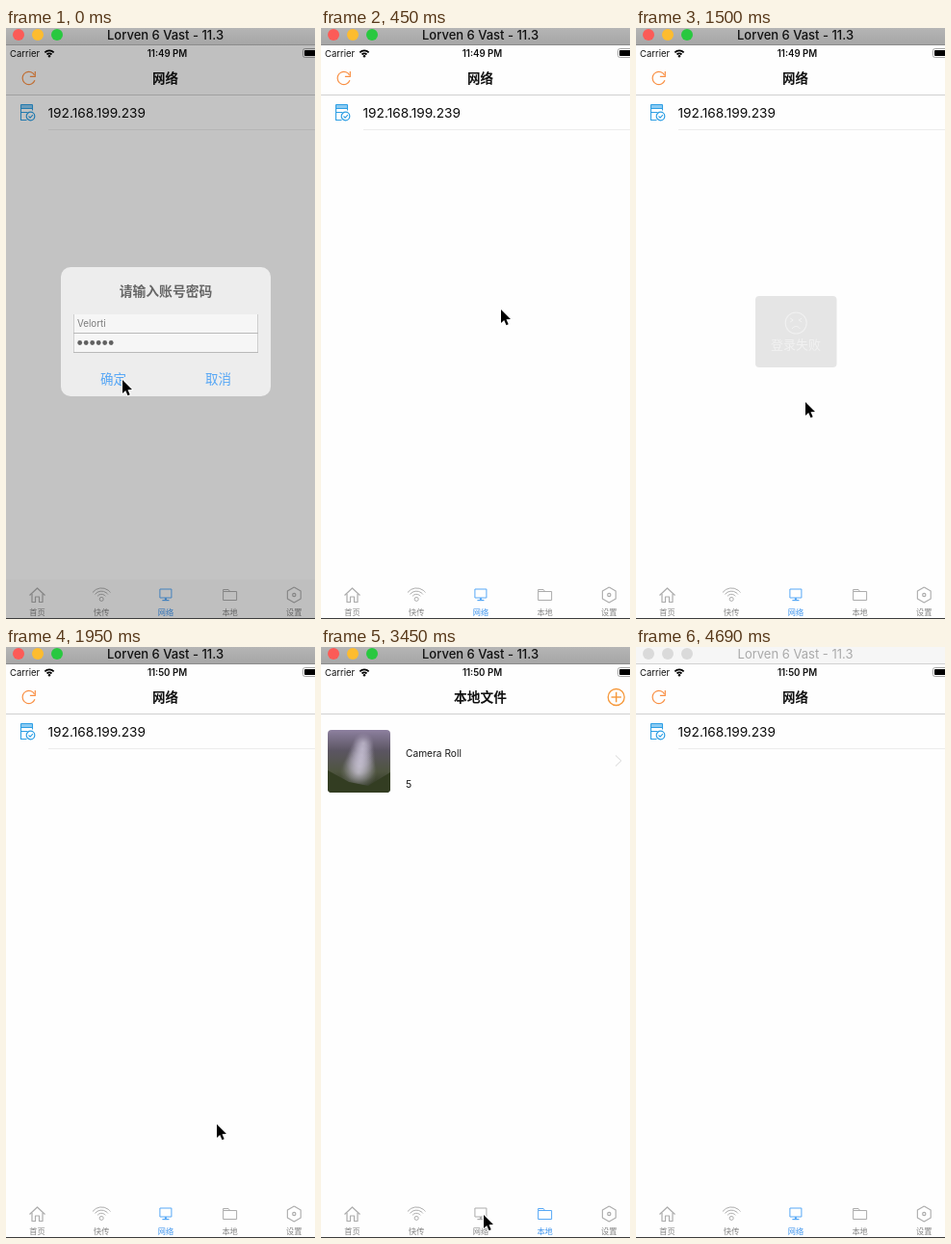
Recreate the animation shown at these times as an HTML page with a canvas. Size 321 by 613 pixels, loop 4790 ms.

```html
<!DOCTYPE html>
<html lang="zh">
<head>
<meta charset="utf-8">
<title>网络</title>
<style>
  html, body { margin: 0; width: 100%; height: 100%; overflow: hidden; background: #fff; }
  canvas { display: block; width: 321px; height: 613px; }
</style>
</head>
<body>
<canvas id="stage"></canvas>
<script>
const W = 321, H = 613, LOOP = 4790, STEP = 150;
const TAU = Math.PI * 2, UP = Math.PI * 1.5;
const canvas = document.getElementById('stage');
const ctx = canvas.getContext('2d');
const dpr = window.devicePixelRatio || 1;
canvas.width = W * dpr;
canvas.height = H * dpr;

const CJK = '"Noto Sans CJK SC", "Noto Sans CJK", sans-serif';
const LATIN = 'Inter, ' + CJK;
const BLUE = '#57a8f6', GRAY = '#acacac', ORANGE = '#f98f43', SKY = '#2e9fe4';

// Pointer stops: step, x, y
const STOPS = [
  [0, 121, 365], [1, 132, 350], [2, 135, 319], [3, 187, 292], [4, 174, 299], [6, 174, 299],
  [8, 151, 289], [9, 156, 312], [10, 176, 388], [11, 201, 419], [13, 219, 495], [14, 219, 499],
  [15, 229, 556], [17, 233, 585], [21, 233, 585], [23, 169, 589], [25, 169, 589], [27, 246, 612]
];

function text(str, x, y, size, color, align = 'left', weight = 400, family = LATIN) {
  ctx.font = `${weight} ${size}px ${family}`;
  ctx.textAlign = align;
  ctx.fillStyle = color;
  ctx.fillText(str, x, y + size * 0.37);
}

function han(str, x, y, size, color, weight = 400) {
  text(str, x, y, size, color, 'center', weight, CJK);
}

function box(x, y, w, h, color) {
  ctx.fillStyle = color;
  ctx.fillRect(x, y, w, h);
}

function frame(x, y, w, h, color, width = 1) {
  ctx.strokeStyle = color;
  ctx.lineWidth = width;
  ctx.strokeRect(x, y, w, h);
}

function roundPath(x, y, w, h, r) {
  ctx.beginPath();
  ctx.roundRect(x, y, w, h, r);
}

function roundBox(x, y, w, h, r, color) {
  roundPath(x, y, w, h, r);
  ctx.fillStyle = color;
  ctx.fill();
}

function trace(points) {
  ctx.beginPath();
  for (let i = 0; i < points.length; i += 2) ctx.lineTo(points[i], points[i + 1]);
}

function line(color, width, ...points) {
  trace(points);
  ctx.strokeStyle = color;
  ctx.lineWidth = width;
  ctx.stroke();
}

function shape(color, ...points) {
  trace(points);
  ctx.fillStyle = color;
  ctx.fill();
}

function arc(color, width, x, y, r, from = 0, to = TAU) {
  ctx.beginPath();
  ctx.arc(x, y, r, from, to);
  ctx.strokeStyle = color;
  ctx.lineWidth = width;
  ctx.stroke();
}

function waves(color, width, x, y, spread, radii) {
  radii.forEach(r => arc(color, width, x, y, r, UP - spread, UP + spread));
}

function dot(color, x, y, r) {
  ctx.beginPath();
  ctx.arc(x, y, r, 0, TAU);
  ctx.fillStyle = color;
  ctx.fill();
}

function fade(y0, y1, ...colors) {
  const g = ctx.createLinearGradient(0, y0, 0, y1);
  colors.forEach((c, i) => g.addColorStop(i / (colors.length - 1), c));
  return g;
}

// Runs a drawing with its own origin
function at(x, y, paint) {
  ctx.save();
  ctx.translate(x, y);
  paint();
  ctx.restore();
}

function windowBar(active) {
  box(0, 0, W, 18, active ? fade(0, 18, '#b5b5b5', '#a5a5a5') : '#f6f6f6');
  box(0, 17, W, 1, active ? '#8c8c8c' : '#d2d2d2');
  ['#fc5b57', '#fdbc2f', '#29c840'].forEach((c, i) => dot(active ? c : '#dadada', 13 + i * 20, 7, 6));
  text('Lorven 6 Vast - 11.3', 165.5, 7.5, 13, active ? '#111' : '#a9a9a9', 'center', active ? 500 : 400);
}

function statusBar(clock) {
  text('Carrier', 4, 26.5, 9.5, '#111');
  waves('#000', 1.8, 45, 30, 0.78, [3.5, 6.6]);
  dot('#000', 45, 29.2, 1.2);
  text(clock, 167.5, 26.5, 9.7, '#111', 'center', 600);
  roundPath(308.5, 21.5, 18, 9, 2);
  ctx.strokeStyle = '#a8a8a8';
  ctx.lineWidth = 1;
  ctx.stroke();
  roundBox(310, 23, 16, 6, 1, '#000');
}

function refreshIcon() {
  arc(ORANGE, 1.2, 0, 0, 6.6, 0.35, TAU - 0.5);
  line(ORANGE, 1.2, 6.6, -7, 6.6, -1.6, 1.2, -1.6);
}

function serverIcon() {
  box(-6, -8, 12, 4, '#8ccbf2');
  [-8, -4, 0].forEach(y => line(SKY, 1, -6, y, y ? 6 : 1, y));
  line(SKY, 1.1, 0, 8, -6, 8, -6, -8);
  line(SKY, 1.1, 6, -8, 6, -2);
  arc(SKY, 1.2, 4, 4, 4.3);
  line(SKY, 1.1, 2, 4, 3.6, 5.6, 6.4, 2.6);
}

function networkPage() {
  han('网络', 165.5, 52, 13.5, '#111', 700);
  at(23.7, 52, refreshIcon);
  at(21.5, 87.5, serverIcon);
  text('192.168.199.239', 43.5, 88, 13.7, '#0a0a0a');
  box(44, 105, W - 44, 1, '#ececec');
}

function photo() {
  ctx.save();
  roundPath(0, 0, 65, 65, 4);
  ctx.clip();
  box(0, 0, 65, 65, fade(0, 65, '#8d809f', '#5b5562', '#4f5540', '#252d19'));
  // Falling water, wider and dimmer towards the mist
  for (let i = 0; i < 6; i++) {
    const x = 37 - i, y = 14 + i * 6, r = 11 + i * 1.6;
    const g = ctx.createRadialGradient(x, y, 0, x, y, r);
    g.addColorStop(0, 'rgba(214,208,226,0.6)');
    g.addColorStop(1, 'rgba(190,182,206,0)');
    box(0, 0, 65, 65, g);
  }
  shape('#333d22', 0, 42, 22, 54, 42, 58, 65, 44, 65, 65, 0, 65);
  ctx.restore();
}

function localPage() {
  han('本地文件', 165.5, 52, 13.7, '#111', 700);
  at(306.7, 52, () => {
    arc('#f6983a', 1.3, 0, 0, 8.5);
    line('#f6983a', 1.4, -5.2, 0, 5.2, 0);
    line('#f6983a', 1.4, 0, -5.2, 0, 5.2);
  });
  at(7, 86, photo);
  text('Camera Roll', 88, 110.5, 10.2, '#1a1a1a');
  text('5', 88, 142.5, 10.5, '#1a1a1a');
  line('#d6d6d6', 1, 306, 112.5, 311.8, 118, 306, 123.5);
}

// Icons are centred on their origin
const TABS = [
  ['首页', c => {
    line(c, 1.2, -8, 0.5, 0, -7, 8, 0.5);
    line(c, 1.2, -5.5, -1, -5.5, 7.5, -2, 7.5, -2, 2, 2, 2, 2, 7.5, 5.5, 7.5, 5.5, -1);
  }],
  ['快传', c => {
    arc(c, 1, 0, 4.4, 2);
    waves(c, 1, 0, 4.5, 0.92, [5.2, 8.4, 11.6]);
  }],
  ['网络', c => {
    frame(-6, -6, 12, 9, c);
    box(-1, 3, 2, 2, c);
    box(-3.5, 5, 7, 1.2, c);
  }],
  ['本地', c => {
    frame(-7, -3.5, 14, 9, c);
    line(c, 1, -7, -3.5, -7, -5.5, -1.5, -5.5, 0, -3.5);
  }],
  ['设置', c => {
    const hex = [];
    for (let i = 0; i <= 6; i++) hex.push(8 * Math.sin(i * TAU / 6), -8 * Math.cos(i * TAU / 6));
    line(c, 1.1, ...hex);
    arc(c, 1.2, 0, 0, 1.6);
  }]
];

function tabBar(active) {
  TABS.forEach(([name, icon], i) => {
    const x = 32.5 + i * 66.7, on = i === active;
    at(x, 588, () => icon(on ? BLUE : GRAY));
    han(name, x, 606, 8.2, on ? '#3d94ee' : '#858585');
  });
}

function dialog(alpha) {
  ctx.globalAlpha = alpha;
  roundBox(57, 248, 218, 134, 10, '#ededed');
  han('请输入账号密码', 166, 272.5, 13.8, '#666', 700);
  box(70, 297, 192, 40, '#f6f6f6');
  [70, 261].forEach(x => box(x, 297, 1, 40, '#cfcfcf'));
  [316, 336].forEach(y => box(70, y, 192, 1, '#b9b9b9'));
  text('Velorti', 74, 306.5, 9.8, '#7b7b7b');
  for (let i = 0; i < 6; i++) dot('#616161', 76.7 + i * 6.5, 326.5, 2.4);
  han('确定', 111.5, 364.5, 13.5, '#55a6f5');
  han('取消', 220.5, 364.5, 13.5, '#55a6f5');
  ctx.globalAlpha = 1;
}

function toast(alpha) {
  ctx.globalAlpha = alpha;
  roundBox(124, 278, 84.5, 74, 4, '#c8c8c8');
  at(166.2, 306, () => {
    arc('#fff', 1.1, 0, 0, 11);
    [-1, 1].forEach(s => line('#fff', 1, 6 * s, -5, 3 * s, -3, 6 * s, -1));
    waves('#fff', 1, 0, 8, 1.1, [4.5]);
  });
  han('登录失败', 166, 328, 13, '#fff');
  ctx.globalAlpha = 1;
}

function pointer(t) {
  const step = Math.floor(t / STEP);
  const next = STOPS.findIndex(s => s[0] > step);
  const a = STOPS[next < 0 ? STOPS.length - 1 : next - 1];
  const b = next < 0 ? a : STOPS[next];
  if (next < 0 && step > a[0]) return;
  const k = a === b ? 0 : (step - a[0]) / (b[0] - a[0]);
  at(a[1] + (b[1] - a[1]) * k, a[2] + (b[2] - a[2]) * k, () => {
    const arrow = [0, 0, 0, 14, 3.2, 11, 5.5, 16.2, 7.7, 15.2, 5.5, 10.2, 10, 10.1, 0, 0];
    line('#fff', 2, ...arrow);
    shape('#000', ...arrow);
  });
}

function draw(t) {
  const dim = t < 150 ? 0.232 : t < 300 ? 0.026 : 0;
  const local = t >= 2850 && t < 3750;
  ctx.setTransform(dpr, 0, 0, dpr, 0, 0);
  ctx.lineJoin = 'round';
  box(0, 0, W, H, '#fefefe');
  if (dim) {
    box(0, 18, W, 51, '#f9f9f9');
    box(0, 572, W, 40, '#f8f8f8');
  }
  statusBar(t < 1950 ? '11:49 PM' : '11:50 PM');
  box(0, 69, W, 1, '#d0d0d0');
  if (local) localPage(); else networkPage();
  tabBar(local ? 3 : 2);
  if (dim) {
    box(0, 18, W, 594, `rgba(0,0,0,${dim})`);
    dialog(t < 150 ? 1 : 0.07);
  }
  if (t >= 600 && t < 1650) toast(t < 1500 ? 1 : 0.47);
  box(0, 612, W, 1, '#3c3c3c');
  windowBar(t < 4690);
  pointer(t);
}

function tick(now) {
  draw(now % LOOP);
  requestAnimationFrame(tick);
}
draw(0);
requestAnimationFrame(tick);
</script>
</body>
</html>
```
